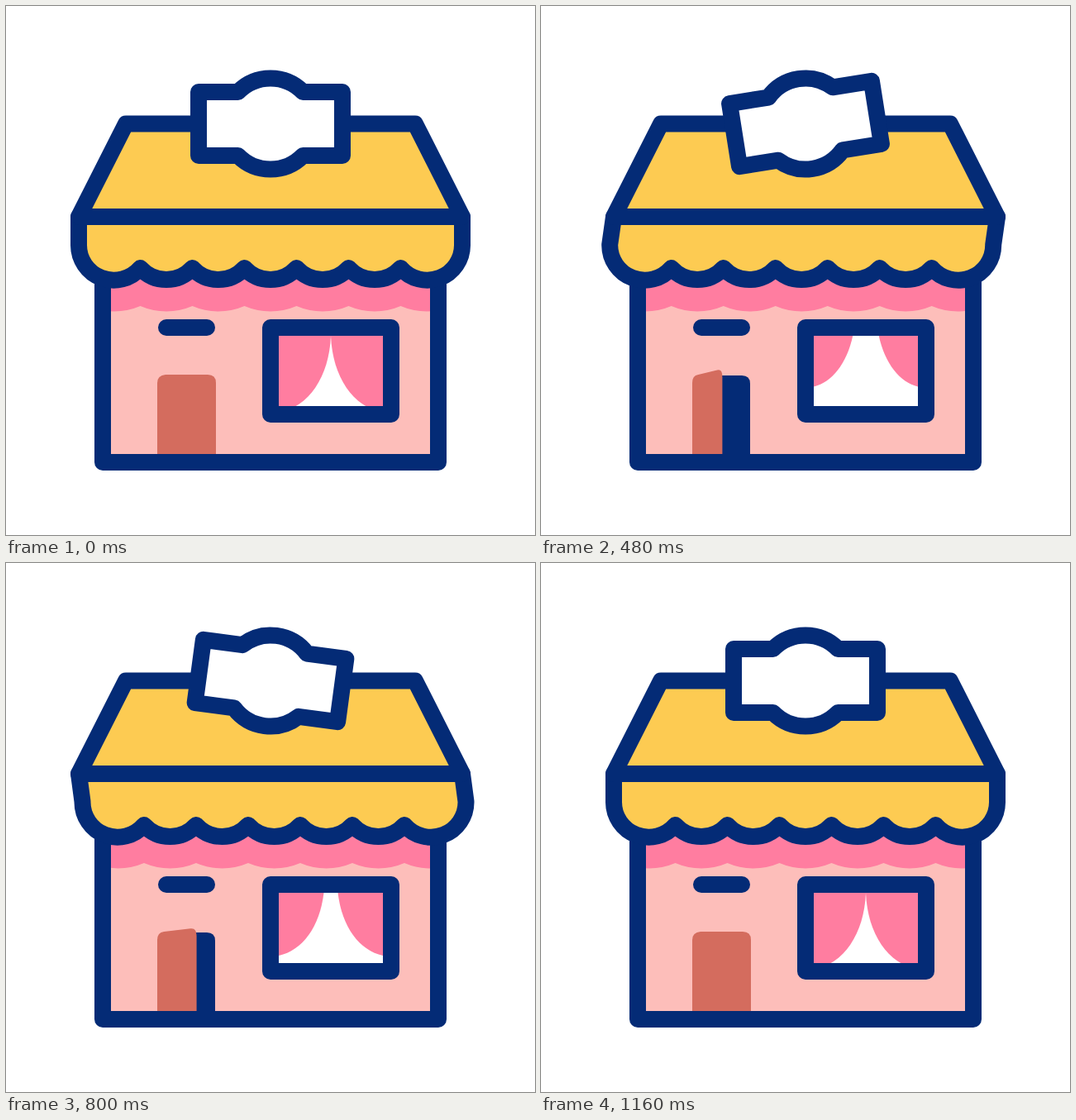
Animation, 640 px wide and 640 px high, one loop 1200 ms. Source, as an HTML page:

```html
<!DOCTYPE html>
<html lang="en">
<head>
<meta charset="utf-8">
<title>Little shop</title>
<style>
  html, body { margin: 0; height: 100%; overflow: hidden; background: #fff; }
  svg { display: block; width: 100%; height: 100%; }
  .line { stroke: #042b76; stroke-width: 20; stroke-linejoin: round; stroke-linecap: round; }
</style>
</head>
<body>
<svg viewBox="0 0 640 640" fill="none">
  <clipPath id="wall"><path d="M117 300H523V552H117Z"/></clipPath>
  <clipPath id="pane"><path d="M320 389H466V494H320Z"/></clipPath>

  <g clip-path="url(#wall)">
    <path fill="#fdbeba" d="M117 300H523V552H117Z"/>
    <path id="shade" fill="#ff7da0"/>
  </g>
  <path fill="#042b76" d="M184 552V457Q184 447 194 447H243Q253 447 253 457V552Z"/>
  <path id="door" fill="#d46c5e"/>
  <path class="line" d="M117 325V552H523V325"/>
  <path class="line" d="M194 389H243"/>

  <g clip-path="url(#pane)">
    <path fill="#fff" d="M320 389H466V494H320Z"/>
    <path id="left" fill="#ff7da0"/>
    <path id="right" fill="#ff7da0" transform="matrix(-1 0 0 1 786 0)"/>
  </g>
  <path class="line" d="M320 389H466V494H320Z"/>

  <path id="awning" class="line" fill="#fdcb52"/>
  <path class="line" fill="#fdcb52" d="M145 142.5H495L552 255H88Z"/>
  <path id="sign" class="line" fill="#fff"
    d="M233 104H280.7A55 55 0 0 1 359.3 104H407V181H359.3A55 55 0 0 1 280.7 181H233Z"/>
</svg>
<script>
const LOOP = 1200, STEP = 40;
const $ = id => document.getElementById(id);
const draw = (id, d) => $(id).setAttribute('d', d);

// Keys are [time, value]; smooth easing between neighbours.
function track(keys, t) {
  const i = keys.findIndex(k => k[0] > t);
  if (i < 0) return keys[keys.length - 1][1];
  if (i === 0) return keys[0][1];
  const [t0, a] = keys[i - 1], [t1, b] = keys[i];
  const u = (t - t0) / (t1 - t0);
  return a + (b - a) * u * u * (3 - 2 * u);
}

const tilt = [[60, 0], [360, -10], [440, -10], [720, 8.3], [740, 8.3], [1080, 0]];
const sway = [[60, 0], [440, -5.3], [735, 4.8], [755, 4.8], [1050, 0]];
const swing = [[60, 0], [570, 37.7], [620, 37.7], [1050, 0]];
const part = [[80, 0], [560, 17], [1040, 0]];

// Arcs hanging between cusps 63 px apart.
function scallops(from, to, dx, y, r) {
  let d = '';
  for (let i = from; i <= to; i++) d += `A${r} ${r} 0 0 0 ${162.5 + 63 * i + dx} ${y}`;
  return d;
}

function drawAwning(dx) {
  const r = 42.4;
  draw('awning', `M88 255L${88 + dx} 288.6${scallops(0, 5, dx, 317, r)}` +
    `A${r} ${r} 0 0 0 ${552 + dx} 288.6L552 255Z`);
  draw('shade', `M${99.5 + dx} 300V363${scallops(0, 6, dx, 363, 80)}V300Z`);
}

function drawDoor(open) {
  const k = open / 38, x = 254 - open, r = 10 - 4 * k, top = 446 - 6 * k;
  draw('door', `M183 552V456Q183 447 ${193 - 3 * k} 446L${x - r} ${top}` +
    `Q${x} ${top - 2 * k} ${x} ${456 - 8 * k}V552Z`);
}

function drawCurtains(g) {
  const d = `M320 389H${393 - g}V399C${391 - 1.35 * g} ${449 - g} ` +
    `${366 - 0.9 * g} ${485 - 1.9 * g} 330 ${492 - 2 * g}H320Z`;
  draw('left', d);
  draw('right', d);
}

function frame() {
  const t = Math.floor(performance.now() % LOOP / STEP) * STEP;
  $('sign').setAttribute('transform', `rotate(${track(tilt, t)} 320 142.5)`);
  drawAwning(track(sway, t));
  drawDoor(track(swing, t));
  drawCurtains(track(part, t));
  requestAnimationFrame(frame);
}
frame();
</script>
</body>
</html>
```
